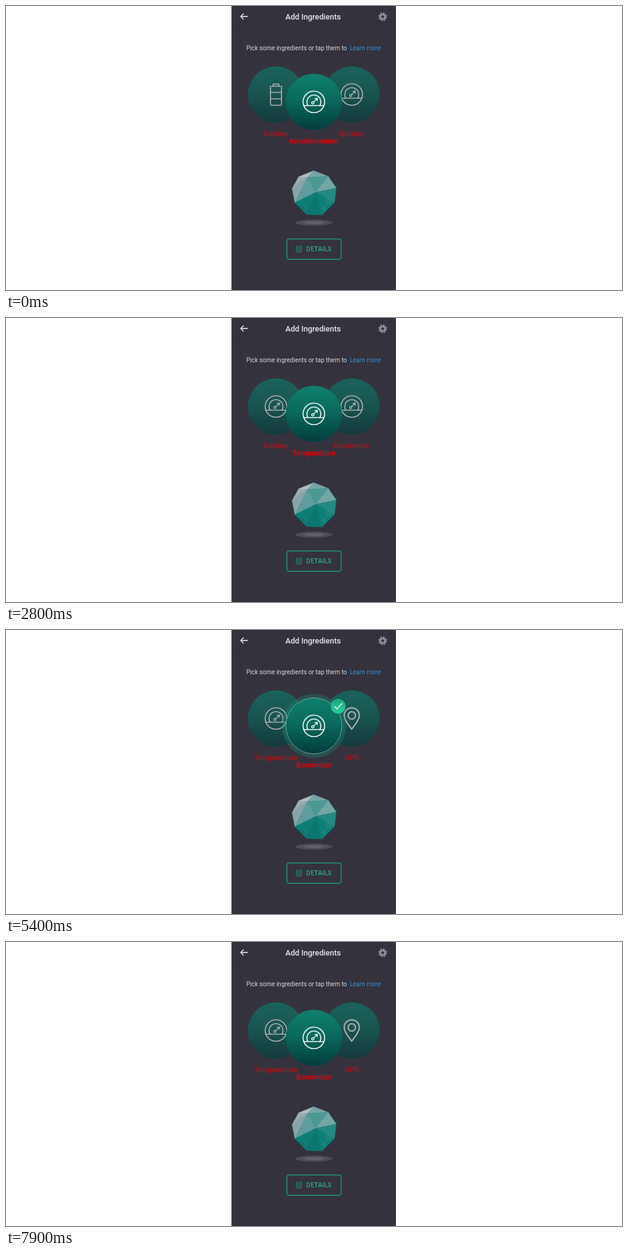
An HTML page that plays this animation: 1000x462 px, repeating every 8 s.

```html
<!DOCTYPE html>
<html lang="en">
<head>
<meta charset="utf-8">
<title>Add Ingredients</title>
<style>
  html, body { margin: 0; width: 100%; height: 100%; overflow: hidden; background: #fff; }
  svg { display: block; width: 100%; height: 100%; }
  text { font-family: Roboto, Inter, sans-serif; }
  .line { fill: none; stroke: #f4f6f6; stroke-width: 1.7; stroke-linecap: round; stroke-linejoin: round; }
  .thin { stroke-width: 1.4; }
  .label { font-size: 12.3px; font-weight: 500; fill: #ea0008; text-anchor: middle; }
</style>
</head>
<body>
<svg viewBox="0 0 1000 462">
  <defs>
    <linearGradient id="disc" x2="0" y2="1">
      <stop stop-color="#0f806d"/><stop offset=".45" stop-color="#0a6a5d"/><stop offset="1" stop-color="#033d3e"/>
    </linearGradient>
    <linearGradient id="badge" x2="0" y2="1">
      <stop stop-color="#1fa77f"/><stop offset="1" stop-color="#22d09a"/>
    </linearGradient>
    <g id="gauge" class="line">
      <circle r="17.5"/>
      <path d="M-16.4 6H16.4M-9.6 6A11.3 11.3 0 1 1 9.6 6"/>
      <g class="thin"><circle cx="-1.8" cy="1.6" r="1.8"/><path d="M-.4 .2L5.5-5.5M2-5.5H5.5V-2"/></g>
    </g>
    <g id="battery" class="line">
      <rect x="-9" y="-13.5" width="18" height="31" rx="1.5"/>
      <path d="M-4.5-13.5V-17H4.5V-13.5M-9-3.5H9M-9 7H9"/>
    </g>
    <g id="pin" class="line" style="stroke-width:2.2">
      <path d="M0 17.5C-5 10-12.3 3-12.3-5A12.3 12.3 0 0 1 12.3-5C12.3 3 5 10 0 17.5Z"/>
      <circle cy="-5" r="6"/>
    </g>
  </defs>

  <rect x="366" width="267" height="462" fill="#34333d"/>
  <path d="M366 36H633" stroke="#312f39"/>
  <path d="M392 17H381M385.5 12.5L381 17L385.5 21.5" class="line thin"/>
  <text x="498.5" y="21.5" font-size="12.7" font-weight="500" fill="#e8e8ec" text-anchor="middle">Add Ingredients</text>
  <g transform="translate(611.5 17.5)" fill="none" stroke="#908f97">
    <circle r="3.8" stroke-width="3"/>
    <circle r="5.9" stroke-width="2.4" stroke-dasharray="2.5 2.134"/>
  </g>
  <text x="390" y="72" font-size="10" fill="#d8d8de">Pick some ingredients or tap them to</text>
  <text x="608.5" y="72" font-size="10" fill="#3f8fd0" text-anchor="end">Learn more</text>

  <g id="items"></g>

  <ellipse cx="500" cy="352.5" rx="30.5" ry="4.8" fill="#504d58"/>
  <ellipse cx="500" cy="352.5" rx="16" ry="2.6" fill="#625f6a"/>
  <g id="gem" opacity=".94"></g>
  <g fill="none" stroke="#5bbdb0" opacity=".4">
    <circle cx="523" cy="318" r="3.5"/><circle cx="516" cy="329" r="2"/>
  </g>

  <g fill="none" stroke="#20987f">
    <rect x="456" y="379" width="88" height="33" rx="3.5" stroke-width="1.4"/>
    <rect x="471.5" y="391" width="8.5" height="9.5" rx="1"/>
    <path d="M473.5 393.5h4.5M473.5 395.7h4.5M473.5 397.9h4.5" stroke-width=".9"/>
  </g>
  <text x="487.5" y="399.2" font-size="10" font-weight="500" letter-spacing=".4" fill="#22b193">DETAILS</text>
</svg>

<script>
const LOOP = 8000, STEP = 100;
const ingredients = [
  ['Battery', 'battery'], ['Accelerometer', 'gauge'], ['Battery', 'gauge'],
  ['Temperature', 'gauge'], ['Barometer', 'gauge'], ['GPS', 'pin'],
];

function group(parent, markup) {
  const g = document.createElementNS('http://www.w3.org/2000/svg', 'g');
  g.innerHTML = markup;
  return parent.appendChild(g);
}

// Gem: named corners and the facets between them.
const corner = {
  A: '499.5,268', B: '523,277', C: '536,296', D: '533,320', E: '513,340', F: '488,339',
  G: '469,320', H: '464.5,297', I: '475,278', P: '489,279', R: '503,303',
};
const facets = {
  IAP: '#bcc6c9', HIP: '#a5b5ba', HPG: '#8eadb1', PRG: '#62a3a4', APB: '#78aeae', PBR: '#4d9f9b',
  BCR: '#76aeac', CDR: '#238f87', RDE: '#0b857b', REF: '#087c73', GRF: '#0a837a',
};
document.getElementById('gem').innerHTML = Object.entries(facets).map(([names, color]) =>
  `<polygon points="${[...names].map(n => corner[n]).join(' ')}" fill="${color}" stroke="${color}" stroke-width=".5"/>`).join('');

const layer = document.getElementById('items');
const items = ingredients.map(([name, icon], index) => {
  const node = group(layer, `
    <circle class="halo" r="52" fill="#1b8f78" opacity=".32"/>
    <circle r="45.7" fill="url(#disc)"/>
    <use href="#${icon}"/>
    <g class="mark">
      <circle r="45.5" fill="none" stroke="#78a39e"/>
      <circle cx="39.5" cy="-32" r="12" fill="url(#badge)"/>
      <path d="M33.5-31.5L37.5-27.5L45.5-36.5" class="line thin"/>
    </g>
    <text class="label" y="68">${name}</text>`);
  return { index, node, extras: node.querySelectorAll('.halo, .mark') };
});

// Each run lists one value per step from its start; its last value then holds.
const swipes = [[0, 1], [1600, 1.3, 1.72, 1.94, 2], [2600, 2.4, 2.86, 3], [3400, 3.4, 3.86, 4]];
const drags = [
  [0, 0],
  [4600, 121, 132, 134, 122, 30, -22, -7, 3, 0],
  [5900, 45, 105, 130, 134, 130, 105, 25, -22, -7, 3, 1, 0],
  [7300, 20, 42, 48, 28, -8, 3, 0],
];
function valueAt(runs, time) {
  const [start, ...values] = runs.findLast(run => run[0] <= time);
  return values[Math.min(values.length - 1, Math.floor((time - start) / STEP))];
}

function render(time) {
  const position = valueAt(swipes, time), drag = valueAt(drags, time);
  const selected = time >= 4600 && time < 6000;
  for (const item of items) {
    const angle = (item.index - position) * Math.PI / 3;
    const held = item.index === 4 ? drag : 0;
    item.depth = Math.abs(angle) > Math.PI ? -1 : Math.cos(angle);
    const x = 499.8 + 71 * Math.sin(angle) + held * 0.042;
    const y = 156 - 24 * (1 - item.depth) + held;
    item.node.setAttribute('transform', `translate(${x} ${y})`);
    item.node.setAttribute('opacity', Math.max(0, (item.depth + 0.35) / 1.35));
    for (const extra of item.extras)
      extra.setAttribute('visibility', selected && item.index === 4 ? 'visible' : 'hidden');
  }
  layer.append(...[...items].sort((a, b) => a.depth - b.depth).map(item => item.node));
}

function tick() {
  render(Math.floor(performance.now() % LOOP / STEP) * STEP);
  requestAnimationFrame(tick);
}
tick();
</script>
</body>
</html>
```
